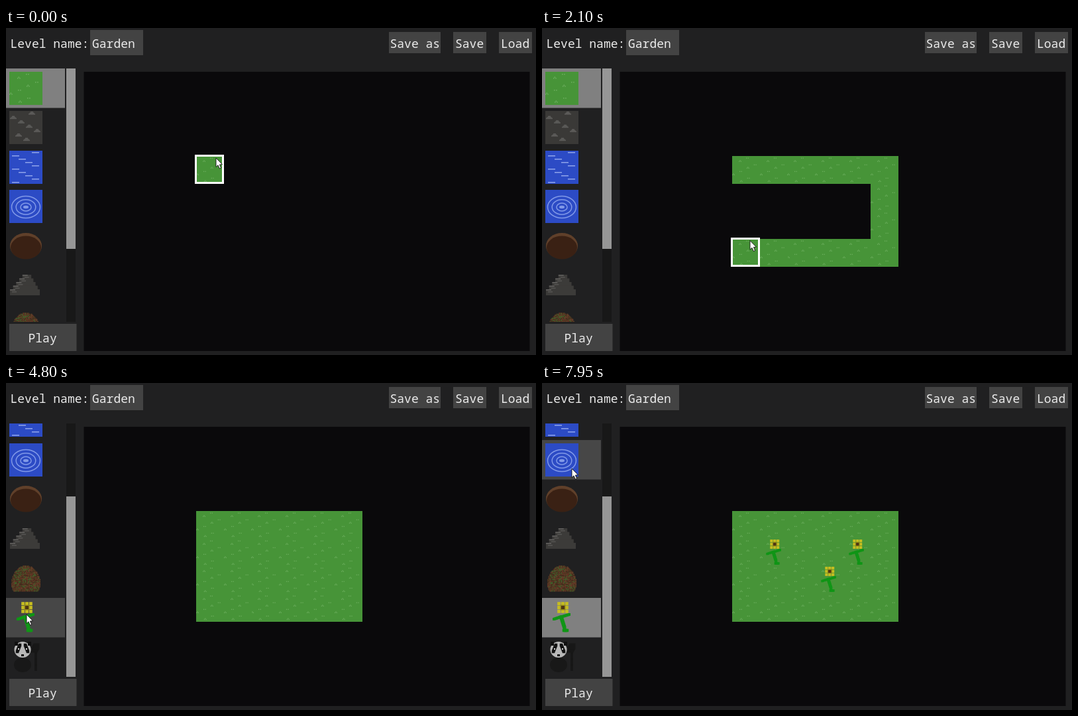
An HTML page with a canvas for the animation above (8 s loop, 800x493 px).

```html
<!DOCTYPE html>
<html lang="en">
<head>
<meta charset="utf-8">
<title>Level editor</title>
<style>
  html, body { margin: 0; height: 100%; overflow: hidden; background: #202021; }
  canvas { display: block; }
</style>
</head>
<body>
<canvas id="stage" width="800" height="493"></canvas>
<script>
const ctx = document.getElementById('stage').getContext('2d');
const LOOP = 8000, STEP = 50;
const CELL = 41.8, GRID_X = 286.8, GRID_Y = 192.8, COLS = 6, ROWS = 4;
const ROW_H = 59.5, LIST_TOP = 61, LIST_H = 382;
const PANEL = { x: 117.5, y: 66, w: 673, h: 421 };
const PIXEL = 50 / 32;
const PAINT_END = 3250, FLOWER_PICKED = 5000, SCROLL_START = 4200, TICK_GAP = 150, TICKS = 3;

// Key points of the pointer: time, x, y
const path = [
  [0, 317, 196], [750, 519, 212], [900, 525, 258], [1250, 518, 338], [2000, 314, 338],
  [2400, 314, 256], [2800, 478, 256], [2900, 474, 297], [PAINT_END, 346, 297],
  [3800, 20, 324], [4200, 20, 324], [4700, 31, 349], [5100, 31, 349],
  [5800, 478, 250], [6300, 435, 294], [6750, 345, 248], [6900, 345, 248], [7950, 45, 129]
];
const flowers = [[5850, 4, 1], [6300, 3, 2], [6850, 1, 1]];

function pointerAt(t) {
  const found = path.findIndex(p => p[0] > t);
  const i = found < 0 ? path.length - 1 : found;
  const [t0, x0, y0] = path[i - 1], [t1, x1, y1] = path[i];
  const u = (t - t0) / (t1 - t0), k = u * 0.6 + u * u * (3 - 2 * u) * 0.4;
  return { x: x0 + (x1 - x0) * k, y: y0 + (y1 - y0) * k };
}

const cellAt = p => ({ c: Math.floor((p.x - GRID_X) / CELL), r: Math.floor((p.y - GRID_Y) / CELL) });
const cellOrigin = (c, r) => [Math.round(GRID_X + c * CELL), Math.round(GRID_Y + r * CELL)];

// Time at which the brush first reaches each cell
const painted = new Map();
for (let t = 0; t <= PAINT_END; t += 10) {
  const { c, r } = cellAt(pointerAt(t));
  const inside = c >= 0 && c < COLS && r >= 0 && r < ROWS;
  if (inside && !painted.has(r * COLS + c)) painted.set(r * COLS + c, t);
}

function rect(color, x, y, w, h) {
  ctx.fillStyle = color;
  ctx.fillRect(x, y, w, h);
}

function ellipse(color, x, y, rx, ry, line) {
  ctx.beginPath();
  ctx.ellipse(x, y, rx, ry, 0, 0, Math.PI * 2);
  ctx.fillStyle = ctx.strokeStyle = color;
  ctx.lineWidth = line;
  line ? ctx.stroke() : ctx.fill();
}

// A line of square stamps
function stroke(color, size, x0, y0, x1, y1) {
  const n = Math.ceil(Math.hypot(x1 - x0, y1 - y0) / PIXEL);
  for (let i = 0; i <= n; i++)
    rect(color, x0 + (x1 - x0) * i / n - size / 2, y0 + (y1 - y0) * i / n - size / 2, size, size);
}

// Spreads marks evenly downwards while x wraps around the tile
function scatter(count, x0, stepX, y0, stepY, mark) {
  for (let i = 0; i < count; i++) mark((x0 + i * stepX) % 40, y0 + i * stepY, i);
}

// All sprites are drawn in a 50 x 50 box
function grass() {
  rect('#479438', 0, 0, 50, 50);
  scatter(8, 25, 27, 3, 6, (x, y, i) => {
    for (let k = 0; k < 3; k++) {
      const middle = k === 1;
      if (i % 2 || !middle) rect('#6cae5e', x + k * PIXEL, middle ? y - PIXEL : y, PIXEL, PIXEL);
    }
  });
}

function gravel() {
  rect('#3a3937', 0, 0, 50, 50);
  scatter(7, 29, 12, 1, 6.6, (x, y) => {
    for (let k = 0; k < 3; k++) rect('#5d5c5a', x + 3 - 1.5 * k, y + 1.5 * k, 4 + 3 * k, 1.6);
  });
}

function water() {
  rect('#2c4bc5', 0, 0, 50, 50);
  scatter(10, 34, 10, 2, 5, (x, y) => rect('#8ca1ea', x, y, 11, PIXEL));
}

function pond() {
  rect('#2c4bc5', 0, 0, 50, 50);
  for (let i = 0; i < 3; i++) ellipse('#8199e8', 25, 26, 21.5 - 6.7 * i, 16.5 - 5.3 * i, 1.5);
  ellipse('#8199e8', 25, 26, 4, 2.2);
}

function hole() {
  ellipse('#60402a', 25, 24.5, 24, 19.5);
  ellipse('#3a2114', 25, 27, 23, 17.5);
}

function rocks() {
  for (let i = 4; i >= 0; i--) {
    const x = 1 + 4.7 * i, y = 31 - 5.5 * i;
    rect('#3c3b39', x, y, 45 - 7.9 * i, 40 - y);
    rect('#62615f', x, y, 8, 1.6);
    rect('#555452', x + 3, y + 3, 7, 1.6);
  }
}

function bush() {
  let seed = 7;
  const random = () => (seed = seed * 16807 % 2147483647) / 2147483647;
  const colors = ['#5b3a22', '#6b452b', '#4a301d', '#6a3826', '#4f3d22', '#46672c'];
  for (let j = 4; j < 29; j++) for (let i = 2; i < 30; i++) {
    const dx = (i - 15.5) / 14, dy = (j - 21) / (j < 21 ? 17.5 : 15);
    const color = colors[Math.floor(random() * colors.length)];
    if (dx * dx + dy * dy < 1) rect(color, i * PIXEL, j * PIXEL, 1.65, 1.65);
  }
}

function flower() {
  const green = '#109516';
  stroke(green, 4, 36, 20, 26, 23);
  stroke(green, 4, 13, 27, 25, 23);
  stroke(green, 5, 24, 24, 29, 40);
  stroke(green, 4.5, 28, 44, 33, 44);
  for (let i = -1; i <= 1; i++) for (let j = -1; j <= 1; j++)
    rect('#c6bd20', 24 + 5.8 * i, 7 + 5.8 * j, 5, 5);
  rect('#8f8519', 22.5, 5.5, 8, 8);
  rect('#4d3514', 24, 7, 5, 5);
}

function badger() {
  stroke('#171717', 4, 40, 18, 40, 44);
  stroke('#171717', 9, 38, 14, 41, 9);
  ellipse('#181818', 20, 37, 13, 11);
  ellipse('#b9b9b9', 20, 14, 12.5, 12);
  for (const side of [-1, 1]) {
    rect('#101010', 18 + 10 * side, 2, 5, 6);
    stroke('#111', 4.5, 20 + 4 * side, 7, 20 + 8 * side, 17);
    rect('#ddd', 19 + 6 * side, 12, 2, 2);
  }
  rect('#111', 18, 21, 4, 3);
}

const palette = [grass, gravel, water, pond, hole, rocks, bush, flower, badger];

function sprite(draw, x, y, scale = 1) {
  ctx.save();
  ctx.translate(x, y);
  ctx.scale(scale, scale);
  draw();
  ctx.restore();
}

function label(text, x, y) {
  ctx.font = '300 18px "Noto Sans Mono", monospace';
  ctx.fillStyle = '#ececec';
  ctx.fillText(text, x, y);
}

function button(text, x, y, w, h, pad = 3) {
  rect('#434343', x, y, w, h);
  label(text, x + pad, y + h / 2 + 7.5);
}

function drawList(t, p) {
  const ticks = Math.floor((t - SCROLL_START) / TICK_GAP) + 1;
  const scroll = Math.min(TICKS, Math.max(0, ticks)) / TICKS;
  const offset = scroll * (palette.length * ROW_H - LIST_H);
  const selected = t < FLOWER_PICKED ? 0 : 7;
  const inList = p.x < 89 && p.y > LIST_TOP && p.y < LIST_TOP + LIST_H;
  const hovered = inList ? Math.floor((p.y - LIST_TOP + offset) / ROW_H) : -1;
  ctx.save();
  ctx.beginPath();
  ctx.rect(0, LIST_TOP, 90, LIST_H);
  ctx.clip();
  palette.forEach((draw, i) => {
    const y = LIST_TOP + i * ROW_H - offset;
    if (i === selected) rect('#808080', 0, y, 89, ROW_H);
    else if (i === hovered) rect('#474747', 0, y, 89, ROW_H);
    sprite(draw, 5, Math.round(y + 4.5));
  });
  ctx.restore();
  rect('#181818', 91, LIST_TOP, 14, LIST_H);
  rect('#969696', 91, LIST_TOP + scroll * 110, 14, 272);
}

function drawMap(t, p) {
  rect('#0a090b', PANEL.x, PANEL.y, PANEL.w, PANEL.h);
  const place = (draw, c, r) => sprite(draw, ...cellOrigin(c, r), 0.84);
  for (const [i, time] of painted) if (t >= time) place(grass, i % COLS, Math.floor(i / COLS));
  for (const [time, c, r] of flowers) if (t >= time) place(flower, c, r);
  if (p.x > PANEL.x) {
    const { c, r } = cellAt(p), [x, y] = cellOrigin(c, r);
    ctx.strokeStyle = '#fff';
    ctx.lineWidth = 3;
    ctx.strokeRect(x - 0.5, y - 0.5, 41, 41);
  }
}

function drawPointer({ x, y }) {
  const arrow = new Path2D('M0 0V13.5L3 10.8L5.3 16L7.6 15L5.4 10L9.5 9.7Z');
  ctx.save();
  ctx.translate(x, y);
  ctx.fillStyle = '#fff';
  ctx.strokeStyle = '#111';
  ctx.lineWidth = 0.9;
  ctx.fill(arrow);
  ctx.stroke(arrow);
  ctx.restore();
}

function draw(t) {
  const p = pointerAt(t);
  rect('#202021', 0, 0, 800, 493);
  label('Level name:', 6.5, 29.5);
  button('Garden', 127, 3, 80, 38);
  button('Save as', 578, 6, 78, 32, 1.5);
  button('Save', 675, 6, 50, 32);
  button('Load', 744, 6, 50, 32);
  drawMap(t, p);
  drawList(t, p);
  button('Play', 5, 446, 101.5, 41, 28.5);
  drawPointer(p);
}

function tick() {
  draw(Math.floor(performance.now() % LOOP / STEP) * STEP);
  requestAnimationFrame(tick);
}
tick();
</script>
</body>
</html>
```
